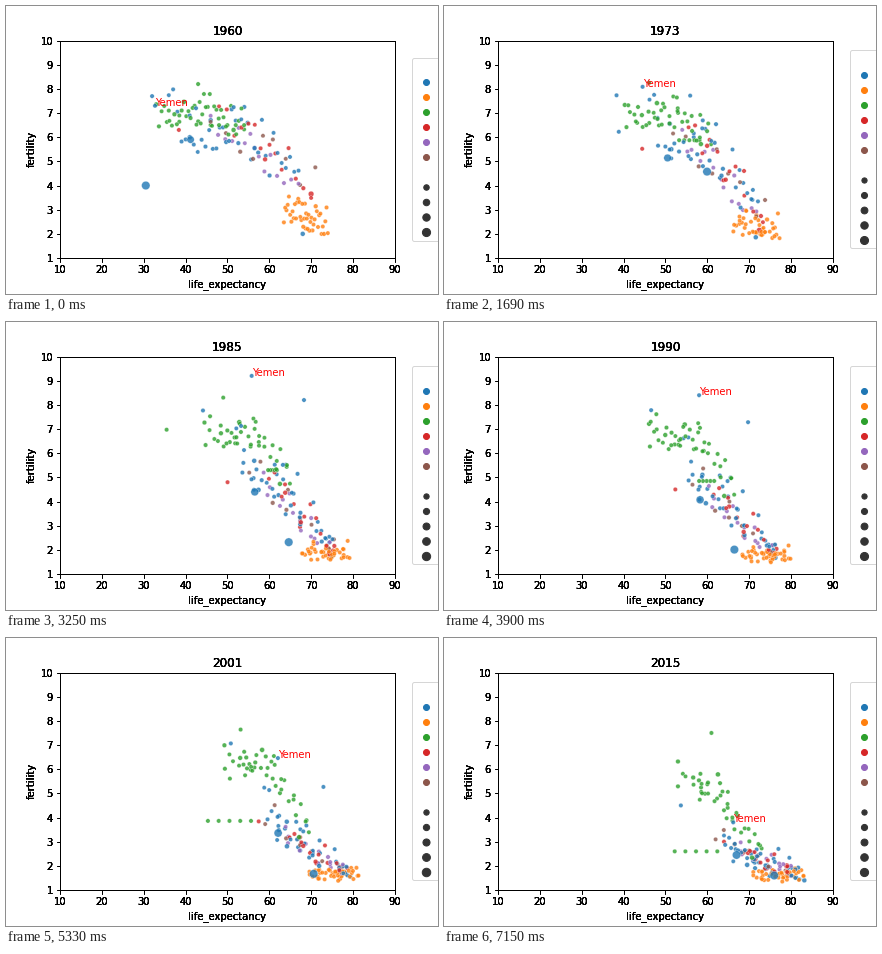
Recreate the animation shown at these times as a matplotlib script. Size 432 by 288 pixels, loop 7280 ms.

```python
import numpy as np
import matplotlib.pyplot as plt
from matplotlib.animation import FuncAnimation
from matplotlib.ticker import MaxNLocator

YEARS = np.arange(1960, 2016)
PROGRESS = ((YEARS - 1960) / 55) ** 0.7
BLUE, ORANGE, GREEN, RED, PURPLE, BROWN = [f"C{i}" for i in range(6)]

rng = np.random.default_rng(12)
countries = []  # (color, life, fertility, population share of the largest)


def mix(pair, q):
    return pair[0] + (pair[1] - pair[0]) * q


def region(color, count, life0, life1, fert0, fert1, mid, width=10, noise=0.55, bend=1):
    """Life rises with easing; fertility falls on a logistic curve.

    Pairs run from the least to the most developed country of the region;
    mid is the year in which half of the fertility decline is done.
    """
    for base in np.linspace(-1, 1, count):
        q = 0.5 + 0.5 * np.sign(base) * abs(base) ** 1.2
        q_end = np.clip(q + rng.normal(0, 0.1), 0, 1)
        v = np.clip(rng.normal(), -1.6, 1.6)
        high = mix(fert0, q) + noise * v
        low = mix(fert1, q) + 0.35 * noise * np.clip(rng.normal(), -1.6, 1.6)
        half = mix(mid, q_end ** bend) + rng.normal(0, 4)
        life = mix((mix(life0, q), mix(life1, q_end)), PROGRESS)
        fert = low + (high - low) / (1 + np.exp((YEARS - half) / width))
        share = min(0.12, 0.012 * np.exp(rng.normal()))
        countries.append((color, life, np.maximum(fert, 1.2), share))


def path(color, *points, share=0.02, dip=None):
    """Country through (year, life, fertility) points; dip = (year, depth, width)."""
    years, life, fert = zip(*points)
    life = np.interp(YEARS, years, life)
    if dip:
        year, depth, width = dip
        life = life - depth * np.exp(-((YEARS - year) / width) ** 2 / 2)
    countries.append((color, life, np.interp(YEARS, years, fert), share))


region(GREEN, 40, (33, 54), (53, 73), (6.8, 7.1), (2.2, 2.1), (2028, 1988), 12, bend=2)
region(ORANGE, 42, (63.5, 74), (71, 83), (3.3, 2.7), (1.5, 1.65), (1973, 1973), 8, 0.45)
region(BLUE, 37, (36, 67), (64, 82), (6.9, 6.0), (2.0, 1.7), (2003, 1972), noise=0.75)
region(RED, 15, (48, 70), (68, 81), (6.9, 5.6), (2.4, 1.8), (1990, 1963))
region(PURPLE, 15, (46, 67), (68, 80), (6.6, 5.6), (2.4, 1.8), (1986, 1965))
region(BROWN, 9, (46, 71), (62, 82), (6.5, 6.0), (3.0, 1.8), (1995, 1960))

# Southern Africa, set back around 2006
for k in range(5):
    path(GREEN, (1960, 46 + 2 * k, 6.5), (1985, 60 + k / 2, 5.3), (2015, 58 + 2 * k, 2.6),
         dip=(2005, 16 - 1.5 * k, 7))

# Rwanda, Ethiopia, Niger
path(GREEN, (1960, 43, 8.2), (1985, 49, 8.3), (1995, 44, 6.3), (2015, 66, 4.0),
     dip=(1994, 31, 0.4))
path(GREEN, (1960, 38.5, 6.9), (1995, 49.5, 7.0), (2015, 64, 4.3), dip=(1984.7, 11.5, 0.9))
path(GREEN, (1960, 36, 7.1), (1995, 49.8, 7.7), (2015, 61, 7.5))
# United States, Haiti
path(RED, (1960, 70, 3.65), (1976, 73, 1.8), (2015, 79, 2.0), share=0.25)
path(RED, (1960, 38.4, 6.3), (2015, 64, 3.0), dip=(2010, 30, 0.4))
# Afghanistan, Japan, Oman, Bangladesh, Cambodia
path(BLUE, (1960, 32, 7.7), (1997, 50, 7.8), (2015, 53.7, 4.5))
path(BLUE, (1960, 68, 2.0), (2015, 83.2, 1.4), share=0.1)
path(BLUE, (1960, 42.5, 7.2), (1985, 68.3, 8.2), (2015, 77, 2.7))
path(BLUE, (1960, 46, 6.7), (1978, 53, 6.5), (2015, 71, 2.2), share=0.1, dip=(1971, 18, 0.5))
path(BLUE, (1960, 41, 6.9), (1985, 54, 5.6), (2015, 69, 2.65), dip=(1977, 32, 2.5))
# Yemen, India, China
path(BLUE, (1960, 32.7, 7.3), (1968, 40.1, 7.5), (1978, 49, 8.67), (1985, 55.8, 9.2),
     (1995, 60.3, 7.6), (2015, 66.2, 3.8))
path(BLUE, (1960, 41.2, 5.9), (1978, 54.1, 4.85), (2015, 67, 2.45),
     share=np.linspace(0.67, 0.96, len(YEARS)))
path(BLUE, (1960, 30.5, 4.0), (1963, 50, 7.4), (1968, 57.8, 6.4), (1978, 62.1, 2.75),
     (1995, 68.3, 1.7), (2015, 76, 1.6), share=1)

yemen = countries[-3]
# Mixed drawing order, the two giants last
countries = [countries[k] for k in rng.permutation(len(countries) - 2)] + countries[-2:]
colors = [c[0] for c in countries]
lives = np.array([c[1] for c in countries])
ferts = np.array([c[2] for c in countries])
shares = np.array([np.broadcast_to(c[3], YEARS.shape) for c in countries])

# Largest population in millions sets the size legend
top_pop = np.interp(YEARS, [1960, 1967, 1978, 1995, 2015], [667, 754, 956, 1205, 1371])


def dot_size(share):
    return 18 + 54 * share


fig = plt.figure(figsize=(6, 4), dpi=72, facecolor="white")
fig.subplots_adjust(left=0.125, right=0.9, bottom=0.125, top=0.88)

# Stacked frames give the labels their heavy, hard-edged look
layers = [fig.add_subplot(label=str(i)) for i in range(5)]
for i, layer in enumerate(layers):
    layer.set(xlim=(10, 90), ylim=(1, 10), xticks=range(10, 91, 10),
              yticks=range(1, 11), xlabel="life_expectancy", ylabel="fertility")
    layer.patch.set_visible(i == 0)
ax = layers[0]

dots = ax.scatter(lives[:, 0], ferts[:, 0], c=colors, s=dot_size(shares[:, 0]),
                  edgecolors="white", linewidths=0.35, alpha=0.8)
label = ax.text(0, 0, "Yemen", color="red")


def draw_legend(pop):
    ticks = [t for t in MaxNLocator(6).tick_values(0.05, pop) if 0 < t <= pop]
    rows = [("none", 36)] + [(f"C{i}", 36) for i in range(6)] + [("none", 36)]
    rows += [("0.2", dot_size(t / pop)) for t in ticks]
    handles = [ax.scatter([], [], color=c, s=s, linewidths=1) for c, s in rows]
    ax.legend(handles, [" "] * len(rows), loc="center left",
              bbox_to_anchor=(1.05, 0.5), borderaxespad=0)
    for handle in handles:
        handle.remove()


def draw(i):
    dots.set_offsets(np.column_stack([lives[:, i], ferts[:, i]]))
    dots.set_sizes(dot_size(shares[:, i]))
    label.set_position((yemen[1][i], yemen[2][i]))
    for layer in layers:
        layer.set_title(str(YEARS[i]))
    draw_legend(top_pop[i])
    return dots, label


anim = FuncAnimation(fig, draw, frames=len(YEARS), interval=130, repeat=True,
                     repeat_delay=0, blit=False)
plt.show()
```
